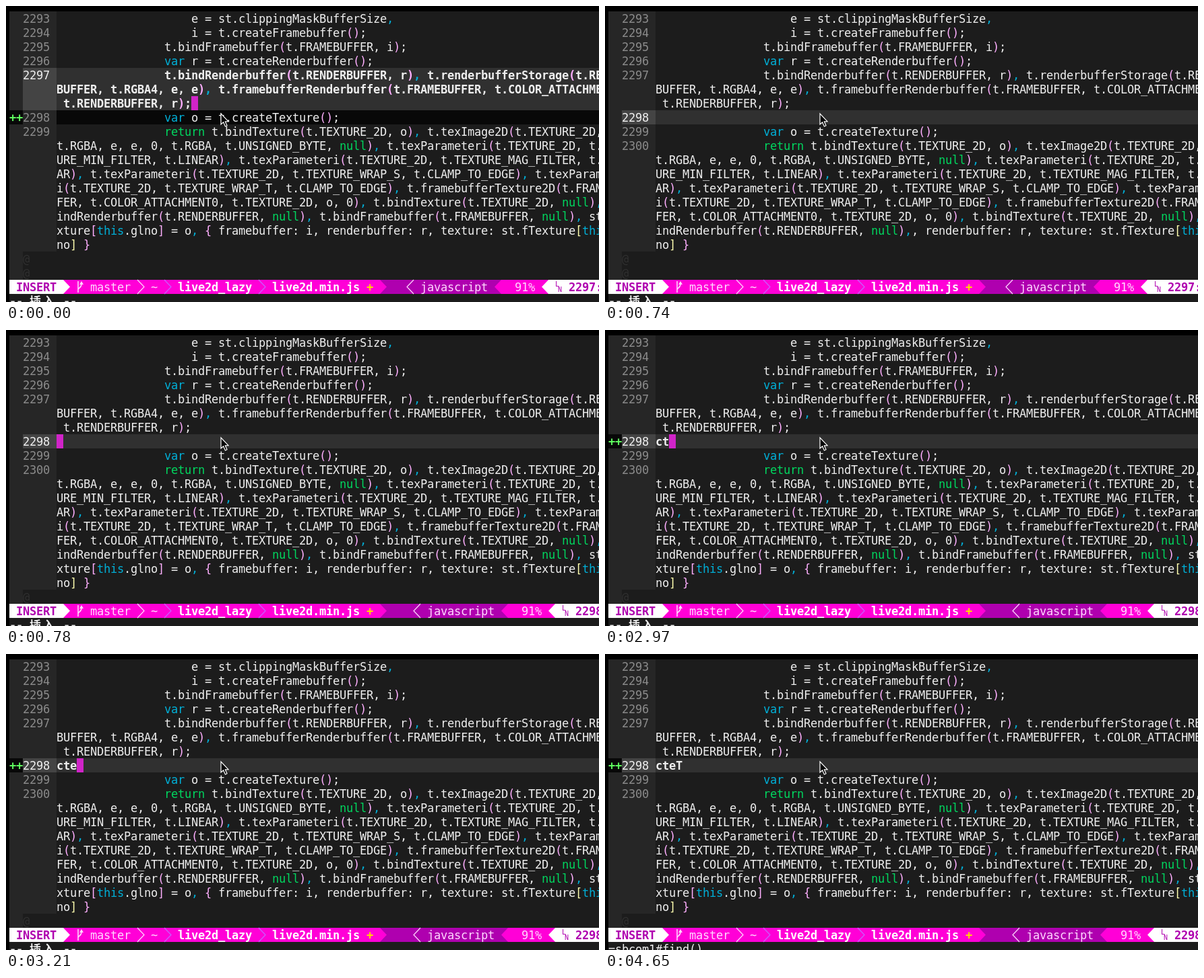
These frames come from a looping animation (880x440 px, 8 s). An HTML page with a canvas:

```html
<!DOCTYPE html>
<html lang="zh-CN">
<head>
<meta charset="utf-8">
<style>
  html, body { margin: 0; width: 100%; height: 100%; overflow: hidden; background: #000; }
  canvas { display: block; }
</style>
</head>
<body>
<canvas id="stage" width="880" height="440"></canvas>
<script>
const ctx = document.getElementById('stage').getContext('2d');
const LOOP = 8000, CELL_W = 10, CELL_H = 21, LEFT = 5, TOP = 8, BASELINE = 17, TEXT_COL = 7, WRAP = 85;
const STATUS_ROW = 19;
const FAMILY = '"DejaVu Sans Mono", "Noto Sans CJK SC", "Noto Sans CJK", monospace';
const C = {
  bg: '#1c1c1c', gutter: '#262626', line: '#303030', lineNr: '#444444', sign: '#080808',
  text: '#eeeeee', num: '#8a8a8a', cyan: '#00afd7', green: '#00d75f', lime: '#5fff5f',
  cursor: '#d024c8', pink: '#ff00d7', purple: '#af00af', pale: '#ffd7ff', violet: '#c75fff'
};
const BRACKETS = ['#ffafff', '#ffffaf'];
const KEYWORDS = { var: C.cyan, this: C.cyan, return: C.green, null: C.green };

const indent = ' '.repeat(16);
const code = [
  indent + '    e = st.clippingMaskBufferSize,',
  indent + '    i = t.createFramebuffer();',
  indent + 't.bindFramebuffer(t.FRAMEBUFFER, i);',
  indent + 'var r = t.createRenderbuffer();',
  indent + 't.bindRenderbuffer(t.RENDERBUFFER, r), t.renderbufferStorage(t.RENDERBUFFER, t.RGBA4, e, e), ' +
    't.framebufferRenderbuffer(t.FRAMEBUFFER, t.COLOR_ATTACHMENT0, t.RENDERBUFFER, r);',
  indent + 'var o = t.createTexture();',
  indent + 'return t.bindTexture(t.TEXTURE_2D, o), ' +
    't.texImage2D(t.TEXTURE_2D, 0, t.RGBA, e, e, 0, t.RGBA, t.UNSIGNED_BYTE, null), ' +
    't.texParameteri(t.TEXTURE_2D, t.TEXTURE_MIN_FILTER, t.LINEAR), ' +
    't.texParameteri(t.TEXTURE_2D, t.TEXTURE_MAG_FILTER, t.LINEAR), ' +
    't.texParameteri(t.TEXTURE_2D, t.TEXTURE_WRAP_S, t.CLAMP_TO_EDGE), ' +
    't.texParameteri(t.TEXTURE_2D, t.TEXTURE_WRAP_T, t.CLAMP_TO_EDGE), ' +
    't.framebufferTexture2D(t.FRAMEBUFFER, t.COLOR_ATTACHMENT0, t.TEXTURE_2D, o, 0), ' +
    't.bindTexture(t.TEXTURE_2D, null), t.bindRenderbuffer(t.RENDERBUFFER, null), ' +
    't.bindFramebuffer(t.FRAMEBUFFER, null), st.fTexture[this.glno] = o, ' +
    '{ framebuffer: i, renderbuffer: r, texture: st.fTexture[this.glno] }'
];

// Coloured characters of one source line; brackets are tinted by depth.
function highlight(text) {
  const cells = [];
  let depth = 0;
  for (const token of text.match(/\w+|\W/g) || []) {
    let color = KEYWORDS[token] || C.text;
    if ('([{'.includes(token)) color = BRACKETS[depth++ % 2];
    else if (')]}'.includes(token)) color = BRACKETS[--depth % 2];
    else if (token === ',' && depth === 0) color = C.cyan;
    for (const ch of token) cells.push({ ch, color });
  }
  return cells;
}

// Screen rows after soft wrapping.
function layout(lines, current) {
  return lines.flatMap((text, i) => {
    const cells = highlight(text), rows = [];
    for (let at = 0; at === 0 || at < cells.length; at += WRAP)
      rows.push({ number: at ? '' : String(2293 + i), cells: cells.slice(at, at + WRAP), current: i === current });
    return rows;
  });
}
const withTyped = typed => layout([...code.slice(0, 5), typed, ...code.slice(5)], 5);

const before = layout(code, 4);
const halfDrawn = [...withTyped('').slice(0, 16), before[16]];
halfDrawn[15] = {
  ...halfDrawn[15],
  cells: [...halfDrawn[15].cells.slice(0, 38), ...before[15].cells.slice(38)]
};
const after = ['', 'c', 'ct', 'cte', 'cteT'].map(withTyped);

const cellX = col => LEFT + col * CELL_W;
const cellY = row => TOP + row * CELL_H;

function fill(row, col, cols, color) {
  ctx.fillStyle = color;
  ctx.fillRect(cellX(col), cellY(row), cols * CELL_W, CELL_H);
}

function put(row, col, text, color = C.text, bold = false) {
  ctx.font = `${bold ? 'bold ' : ''}17px ${FAMILY}`;
  ctx.fillStyle = color;
  for (const ch of text) {
    if (ch !== ' ') ctx.fillText(ch, cellX(col), cellY(row) + BASELINE);
    col += ch > '\u2e80' ? 2 : 1;
  }
}

function drawRow(row, y, blackLine) {
  fill(y, 2, 5, row.current ? C.lineNr : C.gutter);
  if (row.current || blackLine) fill(y, TEXT_COL, 81, row.current ? C.line : C.sign);
  put(y, 2, row.number, row.current ? C.text : C.num);
  row.cells.forEach((cell, i) => put(y, TEXT_COL + i, cell.ch, cell.color, row.current));
}

// Status line arrow one cell wide: dir 1 points right, -1 left.
function arrow(col, dir, color, solid = true) {
  const base = cellX(dir > 0 ? col : col + 1), top = cellY(STATUS_ROW);
  ctx.beginPath();
  ctx.moveTo(base, top);
  ctx.lineTo(base + dir * CELL_W, top + CELL_H / 2);
  ctx.lineTo(base, top + CELL_H);
  ctx.fillStyle = ctx.strokeStyle = color;
  ctx.lineWidth = 1.2;
  if (solid) ctx.fill();
  else ctx.stroke();
}

function branchIcon(col, color) {
  const x = cellX(col), y = cellY(STATUS_ROW);
  ctx.strokeStyle = ctx.fillStyle = color;
  ctx.lineWidth = 1.6;
  ctx.beginPath();
  ctx.moveTo(x + 2, y + 2);
  ctx.lineTo(x + 2, y + 19);
  ctx.moveTo(x + 2, y + 15);
  ctx.bezierCurveTo(x + 2, y + 11, x + 7, y + 13, x + 7, y + 6);
  ctx.stroke();
  ctx.beginPath();
  ctx.moveTo(x + 7, y + 2);
  ctx.lineTo(x + 10, y + 7);
  ctx.lineTo(x + 4, y + 7);
  ctx.fill();
}

function lineIcon(col, color) {
  const x = cellX(col), y = cellY(STATUS_ROW);
  ctx.font = `10px ${FAMILY}`;
  ctx.fillStyle = color;
  ctx.fillText('L', x, y + 10);
  ctx.fillText('N', x + 4, y + 18);
}

function drawStatus(line, shift) {
  const y = STATUS_ROW;
  fill(y, 0, 8, '#fff');
  fill(y, 8, 47, C.pink);
  fill(y, 55, 18 + shift, C.purple);
  fill(y, 73 + shift, 7, C.pink);
  fill(y, 80 + shift, 8, '#fff');
  put(y, 1, 'INSERT', C.purple, true);
  arrow(8, 1, '#fff');
  branchIcon(10, C.pale);
  put(y, 12, 'master', C.pale);
  arrow(19, 1, C.pale, false);
  put(y, 21, '~', C.pale);
  arrow(23, 1, C.violet, false);
  put(y, 25, 'live2d_lazy', '#fff', true);
  arrow(37, 1, C.violet, false);
  put(y, 39, 'live2d.min.js', '#fff', true);
  put(y, 53, '+', '#ffd700', true);
  arrow(55, 1, C.pink);
  arrow(59 + shift, -1, C.pale, false);
  put(y, 61 + shift, 'javascript', C.pale);
  arrow(72 + shift, -1, C.pink);
  put(y, 75 + shift, '91%', C.pale);
  arrow(79 + shift, -1, '#fff');
  lineIcon(81 + shift, C.purple);
  put(y, 83 + shift, line + ':', C.purple, true);
}

function drawPointer() {
  const points = [[0, 0], [0, 16], [3.6, 12.8], [6.4, 19], [9, 17.8], [6.3, 11.8], [11, 11.6]];
  ctx.beginPath();
  for (const [x, y] of points) ctx.lineTo(319 + x, 160 + y);
  ctx.closePath();
  ctx.fillStyle = '#000';
  ctx.fill();
  ctx.strokeStyle = '#fff';
  ctx.lineWidth = 1.2;
  ctx.stroke();
}

function draw(t) {
  const typed = [1690, 2970, 3210, 3740].filter(time => t >= time).length;
  const opened = t >= 780, prompt = t >= 4650;
  const rows = t < 740 ? before : opened ? after[typed] : halfDrawn;
  const signed = t < 420 || t >= 1160;

  ctx.fillStyle = '#000';
  ctx.fillRect(0, 0, 880, 440);
  ctx.fillStyle = C.bg;
  ctx.fillRect(LEFT, TOP, 880, 440);
  for (let y = 0; y < STATUS_ROW; y++) {
    fill(y, 0, 2, C.gutter);
    if (rows[y]) drawRow(rows[y], y, y === 7 && t < 420);
    else put(y, 2, '@', C.line);
  }
  if (signed) {
    fill(7, 0, 2, C.sign);
    put(7, 0, '++', C.lime, true);
  }
  if (t < 740) fill(6, 27, 1, C.cursor);
  else if (opened && !prompt) fill(7, TEXT_COL + typed, 1, C.cursor);
  drawStatus(opened ? 2298 : 2297, opened ? 1 : 0);
  put(20, 0, prompt ? '=sbcom1#find()' : '-- 插入 --', C.text, !prompt);
  drawPointer();
}

function tick() {
  draw(performance.now() % LOOP);
  requestAnimationFrame(tick);
}
tick();
</script>
</body>
</html>
```
